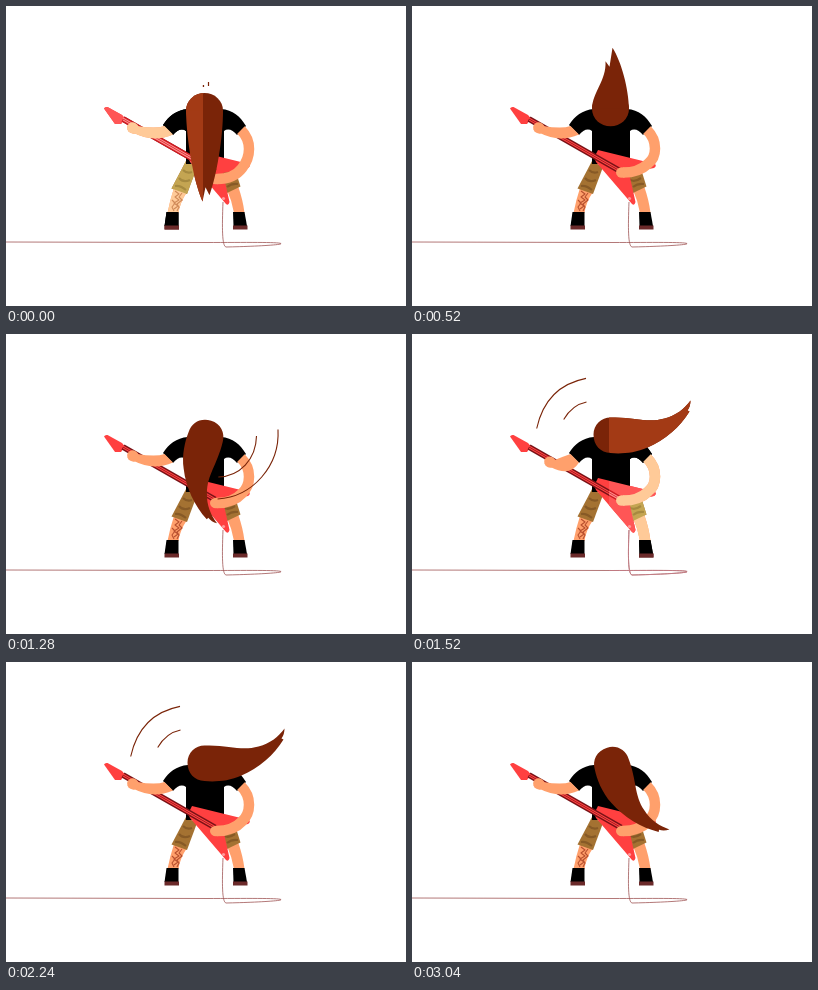
Write an HTML page with a canvas that moves like this. It is 400x300 px and loops after 3.08 s.

```html
<!DOCTYPE html>
<html lang="en">
<head>
<meta charset="utf-8">
<title>Headbanger</title>
<style>
html, body { margin: 0; width: 100%; height: 100%; overflow: hidden; background: #fff; }
canvas { display: block; width: 400px; height: 300px; }
</style>
</head>
<body>
<canvas id="stage" width="400" height="300"></canvas>
<script>
const c = document.getElementById('stage').getContext('2d');
const STEP = 40, COUNT = 77, BANGS = 32, MID = 197;

const dim = {
  hair: '#7a2408', skin: '#ffa06c', short: '#a47232', camo: '#875a26',
  guitar: '#ff4040', neck: '#7a1216', string: '#ff4040', ink: '#b8502f', cable: '#a05656'
};
const lit = {
  hair: '#a33a15', skin: '#ffca98', short: '#c4a552', camo: '#a68a40',
  guitar: '#ff5656', neck: '#d01c22', string: '#ff8c8c', ink: '#d08a58', cable: '#c47c86'
};

// Tip length of the hair through one up-and-down bang (1 is down).
const bang = [1, .93, .5, -.2, -.84, -.67, -.36, .55];
// Stage lights: [first step, last step, side]
const flashes = [[0, 0, 'left'], [26, 27, 'right'], [37, 38, 'right'], [46, 47, 'left']];
const fretKeys = [[0, 127], [20, 127], [23, 120], [27, 120], [32, 127], [36, 138], [40, 138], [44, 127], [77, 127]];
const bangStrum = [[0, 173], [5, 166.5], [8, 173]];
const spinStrum = [[0, 169], [3, 173], [6, 166.5], [8, 169], [12, 169]];

function track(keys, t) {
  const i = Math.max(1, keys.findIndex(k => k[0] >= t));
  const [a, x] = keys[i - 1], [b, y] = keys[i];
  return x + (y - x) * (t - a) / (b - a);
}

function fill(d, color) {
  c.fillStyle = color;
  c.fill(new Path2D(d));
}

function line(d, color, width) {
  c.strokeStyle = color;
  c.lineWidth = width;
  c.lineJoin = 'round';
  c.stroke(new Path2D(d));
}

function ball(x, y, rx, ry, turn, color) {
  c.fillStyle = color;
  c.beginPath();
  c.ellipse(x, y, rx, ry, turn, 0, Math.PI * 2);
  c.fill();
}

function cable(p) {
  line('M0 236L200 236.500C240 236.500 272 236 275 237.500C277 239 245 240.500 220 241C216 240 216 222 217 196', p.cable, .8);
}

function legs(p) {
  fill('M168 182L181 186Q174 196 172.500 207H161.500Q164 194 168 182Z', p.skin);
  fill('M221 184L232 180Q237 194 238.500 207H228Q226 195 221 184Z', p.skin);
  line('M169 185l4 3-4 3 4 3-5 3 4 3-4 3M176 187l-3 4 3 3-5 4 2 3-2 4M166 194l3 3-3 4 2 4', p.ink, 1.1);
  fill('M160.500 206H172.500V220H158.500Z', '#000');
  fill('M227 206H238.500L241 220H227.500Z', '#000');
  fill('M158.500 219.500H173V223.500H158.500ZM227 219.500H241.500V223.500H227Z', '#6b2a2a');
  fill('M180 155L191 161L181 188L165.500 182.500Z', p.short);
  fill('M211 164L228 160L234.500 180.500L221 187Z', p.short);
  line('M177 164q4 4 9 2M173 172q4 5 11 2M169 180q5-1 11 4M217 173q5 4 12-1M221 181q5-4 11-3', p.camo, 2.2);
}

function torso() {
  fill('M182 103C170 104 163 110 157 119L167 129C171 124 176 122 180 125V158H218V125' +
    'C222 122 227 124 231 129L240 120C234 110 227 104 215 103Z', '#000');
}

function guitar(p) {
  fill('M186 144L243 158Q245 160 242 162L217 167L223.500 196Q222.500 200 220 198L184 156Q182 152 184 148Z', p.guitar);
  fill('M98 102.500Q99 100.500 101.500 101L116 109L119 112.500L115 118H109Z', p.guitar);
  line('M117 113L209 165.500', p.neck, 6);
  line('M117 111.900L209 164.400M117 114.100L209 166.600', p.string, 1.1);
  ball(217.5, 192.5, 1.6, 1.6, 0, '#ff9c9c');
}

function arms(p, fret, strum) {
  const y = 122 + (fret - 127) * .56;
  fill(`M158.500 120Q150 123 ${fret + 4} ${y - 2}L${fret + 1} ${y + 5}Q${fret + 20} ${y + 15} 167 128.500Z`, p.skin);
  ball(fret, y, 6, 5.5, .5, p.skin);
  const drop = strum - 167;
  line(`M235 124C246 135 245 151 236 ${158 + drop * .7}C230 ${164 + drop} 220 ${strum} 211 ${strum}`, p.skin, 10.5);
  ball(210, strum, 6, 5.2, 0, p.skin);
}

function bangHair(s, p) {
  const up = s < 0;
  const fork = up ? .78 : .93;
  const side = up ? 'C4 42 18 25' : 'C12 66 18.500 28';
  c.save();
  c.translate(198.5, 103.5 + s);
  ball(0, 0, 18.5, 17.5, 0, p.hair);
  c.scale(up ? -1 : 1, s);
  fill(`M-18.500 0C-18 30 -11 70 -2 91L1 ${fork * 91 - 8}L5 ${fork * 91}${side} 18.500 0Z`, p.hair);
  c.restore();
}

function spinAngle(phase) {
  return (phase < 3 ? 36 * phase : 106 + 42.3 * (phase - 3)) * Math.PI / 180;
}

function spinHair(phase, p) {
  c.save();
  c.translate(198.5, 102.5);
  c.rotate(spinAngle(phase));
  fill('M-17 -2C-17 -12 -9 -19 0 -19C24 -20 36 -13 54 -18C66 -21 74 -28 80 -36' +
    'Q80 -30 77 -26L79 -25C70 -10 54 4 37 11C24 17 9 17.500 0 16.500C-10 16 -17 9 -17 -2Z', p.hair);
  c.restore();
}

// Strokes the part of a curve between two shares of its length.
function trail(d, length, from, to) {
  c.save();
  c.setLineDash([length * (to - from), 999]);
  c.lineDashOffset = -length * from;
  line(d, dim.hair, 1.1);
  c.restore();
}

function bangTrail(phase) {
  const span = { 6: [32, 62], 7: [52, 80], 0: [76, 80] }[phase];
  if (!span) return;
  line(`M202.500 ${span[0]}V${span[1]}M197.500 ${span[0] + 3}V${span[1] + 1}`, dim.hair, 1.2);
}

function spinTrail(phase) {
  const left = { 8: [0, .6], 0: [0, 1], 1: [.7, 1] }[phase];
  const right = { 3: [0, 1], 4: [.65, 1] }[phase];
  if (left) {
    trail('M124.700 94.500Q134 52 174.500 44.300', 75, ...left);
    trail('M151.700 85.500Q160 71 174.500 68', 30, ...left);
  }
  if (right) {
    trail('M272 95.500C274 132 246 164 210 165', 102, ...right);
    trail('M250.500 102C250 126 233 143 211 143', 62, ...right);
  }
}

function figure(n, p) {
  const banging = n < BANGS, r = n - BANGS;
  const phase = banging ? n % 8 : (r + 3) % 9;
  const strum = banging ? track(bangStrum, phase) : track(spinStrum, r % 12);
  cable(p);
  legs(p);
  torso();
  guitar(p);
  arms(p, track(fretKeys, n), strum);
  if (banging) {
    bangTrail(phase);
    bangHair(bang[phase], p);
  } else {
    spinHair(phase, p);
    spinTrail(phase);
  }
}

function draw() {
  const n = Math.floor(performance.now() / STEP) % COUNT;
  c.fillStyle = '#fff';
  c.fillRect(0, 0, 400, 300);
  figure(n, dim);
  const flash = flashes.find(f => n >= f[0] && n <= f[1]);
  if (flash) {
    c.save();
    c.beginPath();
    if (flash[2] === 'left') c.rect(90, 0, MID - 90, 230);
    else c.rect(MID, 0, 400 - MID, 300);
    c.clip();
    figure(n, lit);
    c.restore();
  }
  requestAnimationFrame(draw);
}
draw();
</script>
</body>
</html>
```
